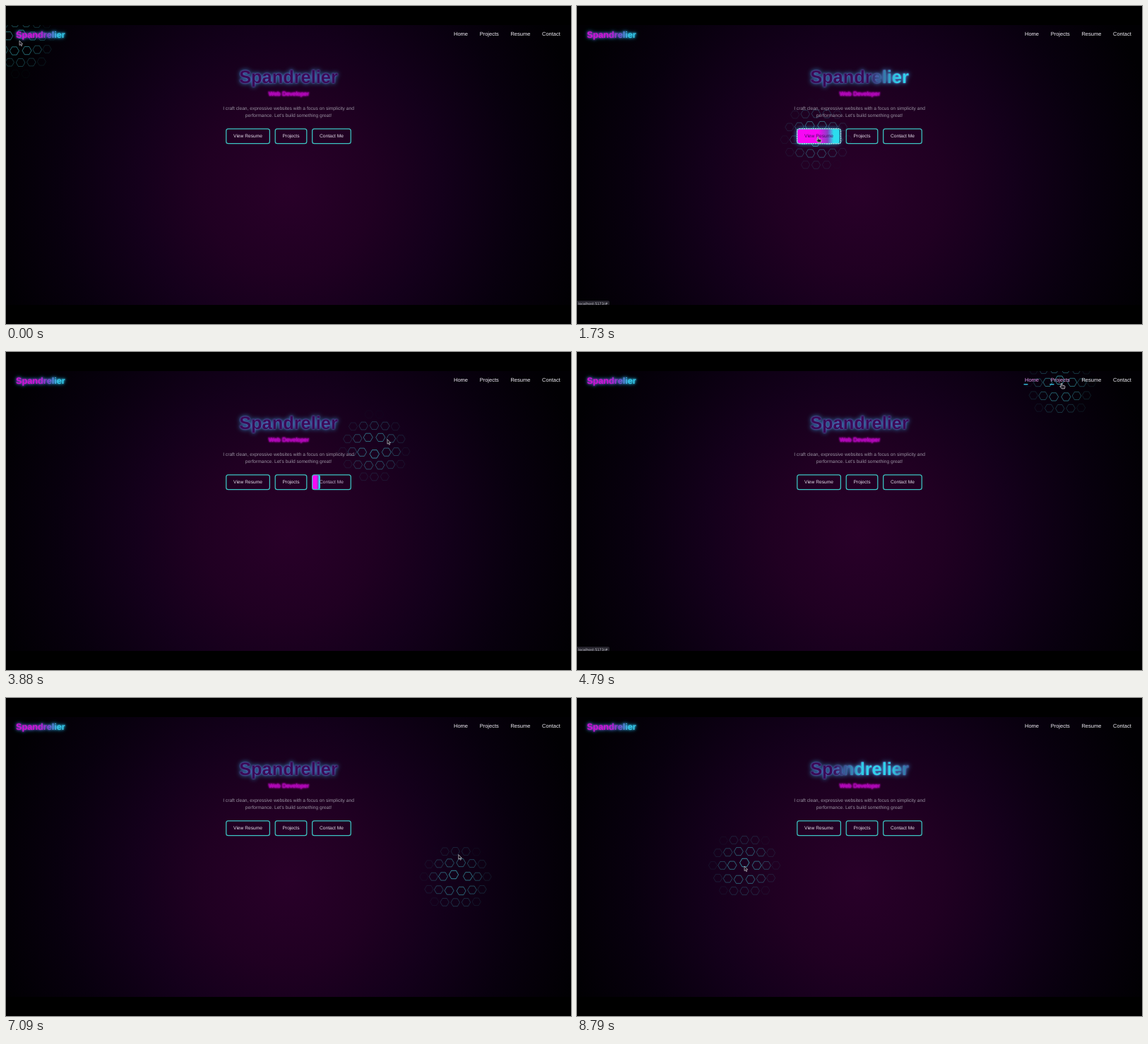
An HTML page with a canvas that plays this animation: 800x450 px, repeating every 8850 ms.

```html
<!DOCTYPE html>
<html lang="en">
<head>
<meta charset="utf-8">
<title>Portfolio</title>
<style>
  html, body { margin: 0; width: 100%; height: 100%; overflow: hidden; background: #000; }
  #page {
    position: absolute; left: 0; top: 27px; width: 800px; height: 396px;
    background: radial-gradient(circle 430px at 400px 230px,
      #290029, #200022 28%, #14001b 50%, #08000e 76%, #010003);
  }
  canvas, svg { position: absolute; left: 0; top: 0; width: 800px; height: 450px; }
  text { font-family: "Liberation Sans", Arial, sans-serif; text-rendering: geometricPrecision; }
  .mid { text-anchor: middle; }
  #title { font-weight: 700; font-size: 25.4px; }
  #titleGlow { filter: drop-shadow(0 0 1px #7468d4) drop-shadow(0 0 3.2px #2f8cc4); }
  #logo { font-weight: 700; font-size: 12.7px; }
  #logoGlow { filter: drop-shadow(0 0 2.6px #1286b0); }
  #role { font-size: 8.33px; fill: #a410b4; filter: drop-shadow(0 0 1px #f0f) drop-shadow(0 0 1.2px #d0d); }
  .lead { font-size: 6.667px; fill: #9a92a2; }
  .btn { font-size: 6.667px; }
  .nav { font-size: 7.5px; }
  #status text { font: 4.9px "DejaVu Sans", sans-serif; fill: #c4c4cc; }
</style>
</head>
<body>
<div id="page"></div>
<canvas id="hexes" width="800" height="450"></canvas>
<svg id="ui" viewBox="0 0 800 450">
  <defs>
    <linearGradient id="sheen" gradientUnits="userSpaceOnUse" x1="-62" x2="65" y1="0" y2="0">
      <stop offset="0" stop-color="#3b0a56"/>
      <stop offset=".33" stop-color="#2fd2ea"/>
      <stop offset=".63" stop-color="#2fd2ea"/>
      <stop offset="1" stop-color="#3b0a56"/>
    </linearGradient>
    <linearGradient id="brand" gradientUnits="userSpaceOnUse" x1="14" x2="84" y1="0" y2="0">
      <stop offset=".45" stop-color="#cf12d6"/>
      <stop offset=".66" stop-color="#7d45cf"/>
      <stop offset=".84" stop-color="#35c6e8"/>
    </linearGradient>
    <linearGradient id="neon">
      <stop offset=".5" stop-color="#f808f4"/>
      <stop offset=".72" stop-color="#8a3fc4"/>
      <stop offset=".86" stop-color="#2bdcee"/>
    </linearGradient>
    <filter id="soft" x="-20%" y="-60%" width="140%" height="220%"><feGaussianBlur stdDeviation="1.5"/></filter>
    <clipPath id="view"><rect y="27" width="800" height="396"/></clipPath>
  </defs>
  <g clip-path="url(#view)">
    <g id="logoGlow">
      <use href="#logo" filter="url(#soft)"/>
      <text id="logo" x="14" y="44.5" fill="url(#brand)">Spandrelier</text>
    </g>
    <g id="titleGlow">
      <text id="title" class="mid" x="400" y="108.5" fill="url(#sheen)">Spandrelier</text>
    </g>
    <text id="role" class="mid" x="400.3" y="126.8">Web Developer</text>
    <text class="lead mid" x="400" y="147">I craft clean, expressive websites with a focus on simplicity and</text>
    <text class="lead mid" x="400" y="157">performance. Let's build something great!</text>
    <g id="links"></g>
    <g id="status">
      <path d="M0 417h44q2 0 2 2v5H0z" fill="#25232c"/>
      <text x="1.8" y="422.6">localhost:5173/#</text>
    </g>
    <g id="cursor" stroke="#d2d2d8" stroke-linejoin="round">
      <path id="arrow" d="M0 0v6.6l1.5-1.3 1.1 2.4 1.1-.5-1.1-2.3h2.1z" fill="#18141e" stroke-width=".65"/>
      <path id="hand" d="M-.6.5q.8-.8 1.5 0v2.7l3.2.6q1 .3.8 1.4l-.6 2.7H.2l-2.5-3q-.2-1 .8-.8l.9.7z" fill="#2a2630" stroke-width=".75"/>
    </g>
  </g>
</svg>
<script>
const LOOP = 8850, FADE = 400, LAG = 60;
const $ = id => document.getElementById(id);
const clamp = (v, a = 0, b = 1) => Math.min(b, Math.max(a, v));
const ease = p => p * p * (3 - 2 * p);
const mix = (a, b, p) => `rgb(${a.map((v, i) => Math.round(v + (b[i] - v) * p))})`;

// pointer path: time, x, y
const PATH = [
  [0, 19, 49], [400, 60, 52], [900, 235, 138], [1300, 325, 176], [1730, 341, 185],
  [2150, 352, 186], [2400, 395, 186], [2875, 424, 192], [2970, 436, 193], [3030, 455, 195],
  [3090, 460, 194], [3550, 452, 180], [3950, 560, 110], [4250, 640, 46], [4590, 652, 42],
  [4730, 684, 47], [4790, 686, 44], [5050, 722, 41], [5400, 745, 42], [5600, 782, 46],
  [5850, 787, 50], [5910, 772, 48], [6150, 690, 90], [6390, 560, 135], [6600, 330, 190],
  [6730, 214, 240], [6850, 400, 283], [6960, 580, 282], [7030, 638, 256], [7090, 641, 222],
  [7350, 540, 130], [7700, 380, 110], [8000, 265, 175], [8180, 237, 238], [LOOP, 237, 238]
];

function pointer(t) {
  t = clamp(t, 0, LOOP);
  const last = PATH.length - 1;
  let i = 0;
  while (i < last - 1 && PATH[i + 1][0] <= t) i++;
  const a = PATH[i], b = PATH[i + 1], h = b[0] - a[0], s = (t - a[0]) / h;
  const slope = (k, c) => {
    if (k === 0 || k >= last - 1) return 0;
    const p = PATH[k - 1], n = PATH[k + 1];
    return (n[c] - p[c]) / (n[0] - p[0]);
  };
  return [1, 2].map(c => a[c] + (b[c] - a[c]) * ease(s)
    + h * s * (1 - s) * ((1 - s) * slope(i, c) - s * slope(i + 1, c)));
}

// label, left, width, hover start, hover end
const BUTTONS = [
  ["View Resume", 311.15, 62.8, 1330, 2150],
  ["Projects", 380.6, 45.8, 2350, 2875],
  ["Contact Me", 433.05, 55.8, 2982, 3600]
];
const NAV = [
  ["Home", 634, 20, 4250, 4590],
  ["Projects", 670.7, 27.1, 4670, 5000],
  ["Resume", 714.4, 27.9, 5050, 5330],
  ["Contact", 759, 25.8, 5400, 5510]
];
const STATUS = [[1340, 2250], [2360, 3800], [4260, 6100]];
const HAND = [[1330, 2180], [2350, 3600], [4250, 5780]];
const FOCUS = [[1500, 1950]];
const SWEEPS = [1150, 2941, 4000, 5676, 7120, 8347];
const within = (spans, t) => spans.some(([a, b]) => t >= a && t < b);

function hover(t, from, to) {
  const top = clamp((to - from) / FADE);
  return ease(t < to ? clamp((t - from) / FADE) : clamp(top - (t - to) / FADE));
}

function add(tag, attrs, label) {
  const el = document.createElementNS("http://www.w3.org/2000/svg", tag);
  for (const k in attrs) el.setAttribute(k, attrs[k]);
  if (label) el.textContent = label;
  $("links").append(el);
  return el;
}

const buttons = BUTTONS.map(([label, x, w, from, to]) => ({
  from, to, w,
  fill: add("rect", { x: x + .6, y: 173.9, height: 20.6, rx: 2.4, fill: "url(#neon)" }),
  edge: add("rect", { x: x + .6, y: 173.8, width: w - 1.2, height: 20.8, rx: 2.9, fill: "none", stroke: "#3cc4c2", "stroke-width": 1.25 }),
  text: add("text", { class: "btn mid", x: x + w / 2, y: 186.4 }, label)
}));
const focusRing = add("rect", {
  x: 311.6, y: 173.6, width: 62, height: 21.2, rx: 3, fill: "none",
  stroke: "#f4eaff", "stroke-width": .9, "stroke-dasharray": "2 1.2"
});
const nav = NAV.map(([label, x, w, from, to]) => ({
  from, to, w,
  line: add("rect", { x: x - 1.4, y: 45.1, height: 1.4, fill: "#35c4e4" }),
  text: add("text", { class: "nav", x, y: 41.5 }, label)
}));

const ctx = $("hexes").getContext("2d");
const GRID = { x: 6.86, y: 27.7, w: 13.54, h: 16.1 }, REACH = 46;

function hexagon(x, y, r) {
  ctx.beginPath();
  for (let i = 0; i < 6; i++) {
    const a = i * Math.PI / 3;
    ctx.lineTo(x + r * Math.cos(a), y + r * Math.sin(a));
  }
  ctx.closePath();
  ctx.stroke();
}

function drawHexes(t) {
  const [mx, my] = pointer(t - LAG);
  ctx.clearRect(0, 0, 800, 450);
  ctx.save();
  ctx.beginPath();
  ctx.rect(0, 27, 800, 396);
  ctx.clip();
  ctx.lineWidth = .85;
  for (let row = -1; row < 26; row++) {
    const y = GRID.y + row * GRID.h;
    for (let col = -1; col < 61; col++) {
      // odd rows sit on the full column, even rows half a column over
      const x = GRID.x + (col + (row % 2 ? 0 : .5)) * GRID.w;
      const dx = x - mx, dy = y - my, d = Math.hypot(dx, dy);
      if (d > REACH) continue;
      const near = 1 - d / REACH, k = 4 / Math.max(d, .5);
      ctx.strokeStyle = `rgba(72,204,216,${.85 * near})`;
      hexagon(x + dx * k, y + dy * k, 6 + .7 * near);
    }
  }
  ctx.restore();
}

function draw(t) {
  drawHexes(t);

  const start = SWEEPS.filter(s => s <= t).pop();
  const sheen = start === undefined ? -200 : 270 + (t - start) * .35;
  $("sheen").setAttribute("gradientTransform", `translate(${sheen})`);

  for (const b of buttons) {
    const p = hover(t, b.from, b.to);
    b.fill.setAttribute("width", (b.w - 3) * p);
    b.fill.style.display = p > 0 ? "" : "none";
    b.fill.style.filter = p > .5 ? `drop-shadow(0 0 3.5px rgba(40,190,235,${2 * p - 1}))` : "none";
    b.text.setAttribute("fill", mix([228, 222, 234], [70, 10, 100], p));
  }
  focusRing.style.display = within(FOCUS, t) ? "" : "none";

  for (const n of nav) {
    const p = hover(t, n.from, n.to);
    n.line.setAttribute("width", (n.w + 1) * p);
    n.text.setAttribute("fill", mix([240, 238, 244], [214, 60, 226], clamp(p * 1.8)));
  }

  $("status").style.display = within(STATUS, t) ? "" : "none";
  const hand = within(HAND, t), [x, y] = pointer(t);
  $("hand").style.display = hand ? "" : "none";
  $("arrow").style.display = hand ? "none" : "";
  $("cursor").setAttribute("transform", `translate(${x} ${y})`);
}

const began = performance.now();
function tick() {
  draw((performance.now() - began) % LOOP);
  requestAnimationFrame(tick);
}
draw(0);
requestAnimationFrame(tick);
</script>
</body>
</html>
```
